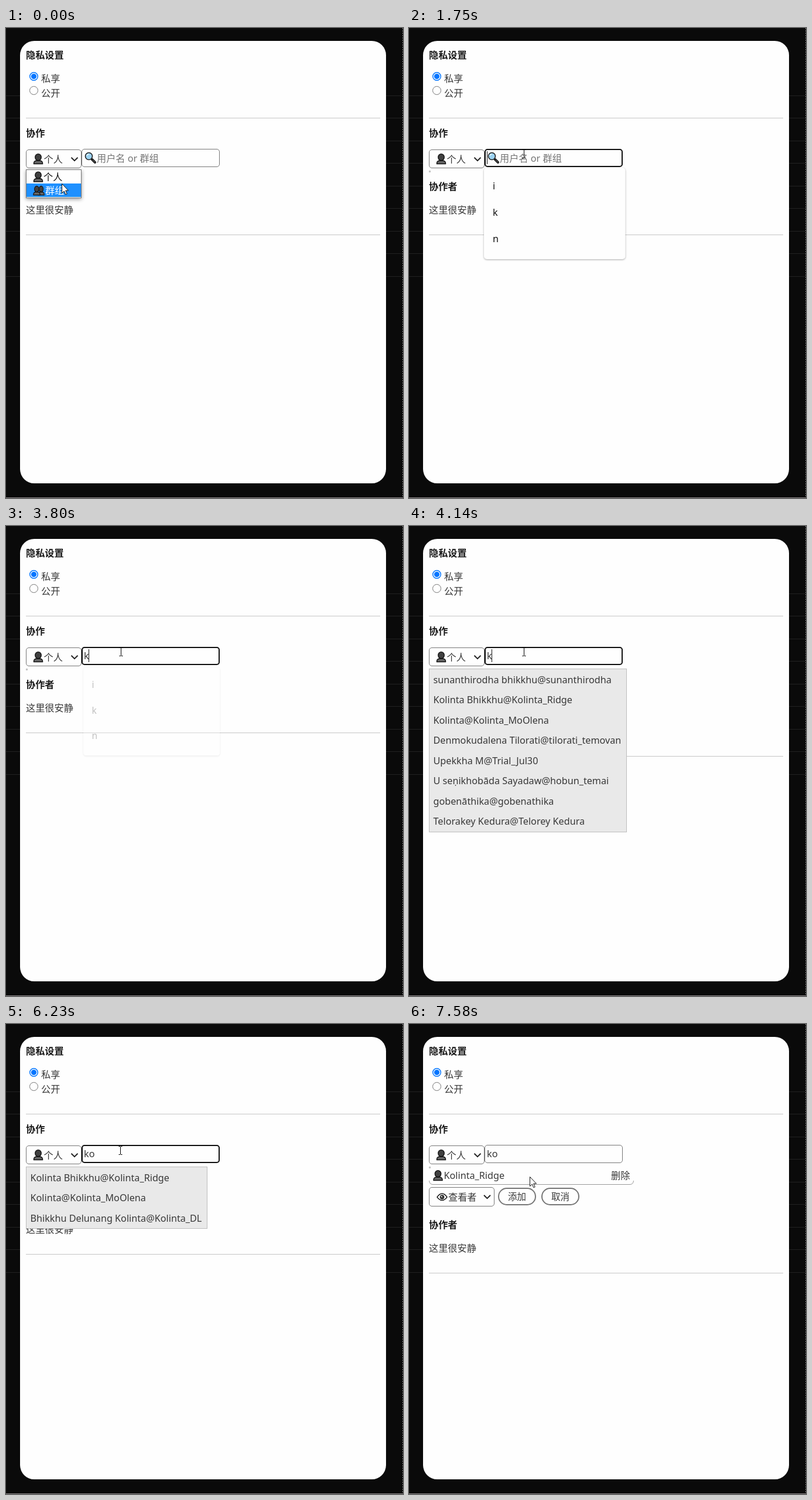
Write an HTML page that moves like this. It is 678x801 px and loops after 8000 ms.

```html
<!DOCTYPE html>
<html lang="zh-CN">
<head>
<meta charset="utf-8">
<title>隐私设置</title>
<style>
  html, body { margin: 0; width: 100%; height: 100%; overflow: hidden; background: #0a0a0a; }
  svg { display: block; font: 16.2px 'Noto Sans', 'Noto Sans CJK SC', sans-serif; fill: #383838; }
  text { white-space: pre; }
  .title { font-weight: 700; fill: #1a1a1a; }
  .hint { fill: #757575; }
  .black { fill: #111; }
  .white { fill: #fff; }
  .box { fill: #fefefe; stroke: #767676; }
  .focus { fill: #fefefe; stroke: #101010; stroke-width: 2; }
  .rule { stroke: #c6c6c6; }
  .list { fill: #e9e9e9; stroke: #bdbdbd; }
  .pick { fill: #1e90ff; }
  .row { fill: #6ba6ff; }
  .pill { fill: #fefefe; stroke: #767676; stroke-width: 2; }
  .small { font-size: 15.5px; }
  .shade { filter: drop-shadow(0 2px 3px #0006); }
  .soft { filter: drop-shadow(0 1px 1.5px #0005); }
</style>
</head>
<body>
<svg width="678" height="801" viewBox="0 0 678 801">
  <defs>
    <g id="person" stroke="#111" stroke-width="1.4">
      <path d="M-7.5 8.5V7Q-7 3.500-3 3H3Q7 3.500 7.500 7V8.500Z" fill="#666"/>
      <ellipse cy="-2.8" rx="5.2" ry="5.6" fill="#404040"/>
    </g>
    <g id="people">
      <use href="#person" transform="translate(4 0) scale(.7 .9)"/>
      <use href="#person" transform="translate(-3.5 0) scale(.75 .9)"/>
    </g>
    <g id="lens">
      <path d="M3 3L8 8" stroke="#111" stroke-width="4" stroke-linecap="round"/>
      <path d="M4 4L8 8" stroke="#555" stroke-width="1.6" stroke-linecap="round"/>
      <circle cx="-2.5" cy="-2.5" r="6" fill="#9cd3f3" stroke="#222" stroke-width="1.6"/>
      <path d="M-6-3Q-5.5-6-2.5-6" fill="none" stroke="#e8f6ff" stroke-width="1.3"/>
    </g>
    <g id="eye" stroke="#111">
      <path d="M-8.5 0Q0-12 8.5 0Q0 11-8.5 0Z" fill="#fff" stroke-width="1.3"/>
      <circle r="3.4" fill="#444"/>
      <circle cx="-1" cy="-1" r="1" fill="#fff" stroke="none"/>
    </g>
    <path id="chevron" d="M-5.5-2.7L0 2.7L5.5-2.7" fill="none" stroke="#222" stroke-width="1.9"/>
    <path id="arrow" d="M.5.5V16.5L4.3 13L6.8 18.7L9.2 17.7L6.7 12H11.5Z" fill="#fff" stroke="#111"/>
    <path id="beam" d="M-3-7H-.5M.5-7H3M0-6.5V6.5M-3 7H-.5M.5 7H3" fill="none" stroke="#000"/>
    <g id="busy" fill="none">
      <circle r="8.7" stroke="#fff" stroke-width="2"/>
      <circle r="9.8" stroke="#111"/>
      <circle r="7.6" stroke="#333" stroke-width=".7"/>
      <path d="M0-7V7" stroke="#fff" stroke-width="3"/>
      <use href="#beam"/>
    </g>
    <rect id="caret" class="black" y="210" width="1" height="22"/>
    <g id="collab">
      <text class="title" x="34" y="276">协作者</text>
      <text x="34" y="315.5">这里很安静</text>
      <path class="rule" d="M34 352.5H639"/>
    </g>
    <g id="popup">
      <rect class="soft" x="128" y="238" width="241.5" height="156" rx="5" fill="#fefefe"/>
      <g class="black">
        <text x="143" y="275">i</text>
        <text x="143" y="320">k</text>
        <text x="143" y="365">n</text>
      </g>
    </g>
  </defs>

  <rect width="678" height="801" fill="#0a0a0a"/>
  <g id="grid" stroke="#222"></g>
  <path d="M677.5 0V801" stroke="#777" stroke-dasharray="2 2"/>
  <path d="M0 800.5H678" stroke="#8c8688"/>
  <rect x="24" y="22" width="625" height="754" rx="24.3" fill="#fefefe"/>

  <text class="title" x="34" y="52">隐私设置</text>
  <circle cx="47.5" cy="82.5" r="6.8" fill="#fff" stroke="#0075ff" stroke-width="1.5"/>
  <circle cx="47.5" cy="82.5" r="4.6" fill="#0075ff"/>
  <circle cx="47.5" cy="106.5" r="7" class="box"/>
  <text x="60" y="91.5">私享</text>
  <text x="60" y="116.5">公开</text>
  <path class="rule" d="M34 153.5H639"/>
  <text class="title" x="34" y="185">协作</text>

  <use href="#collab" data-on="0-4140"/>
  <use href="#collab" y="40" data-on="4140-7580"/>
  <use href="#collab" y="72" data-on="7580-8000"/>

  <rect class="box" x="34.5" y="207.5" width="94" height="31" rx="4.5"/>
  <use href="#person" x="55" y="223"/>
  <text x="64.5" y="229.5">个人</text>
  <use href="#chevron" x="117" y="223.5"/>

  <rect class="box" x="129.5" y="206.5" width="235" height="30" rx="4.5" data-on="0-1750 7240-8000"/>
  <rect class="focus" x="130" y="207" width="234" height="29" rx="4" data-on="1750-7240"/>
  <g data-on="0-3800">
    <use href="#lens" x="144" y="221"/>
    <text class="hint" x="155" y="227.5">用户名 or 群组</text>
  </g>
  <text x="133" y="227" data-on="3800-4840">k</text>
  <text x="133" y="227" data-on="4840-8000">ko</text>
  <use href="#caret" x="133" data-on="1750-2440 2780-3120"/>
  <use href="#caret" x="141" data-on="3800-4500"/>
  <use href="#caret" x="151" data-on="4840-5180 5890-6230 6900-7240"/>
  <rect x="34.5" y="243.5" width="2" height="2" class="list" data-on="1750-4140 7580-8000"/>

  <g data-on="0-1070">
    <rect class="box shade" x="34.5" y="241.5" width="94" height="48"/>
    <rect class="pick" x="35" y="265" width="93" height="23" data-on="0-360"/>
    <rect class="pick" x="35" y="242" width="93" height="23" data-on="360-1070"/>
    <use href="#person" x="55" y="253.5"/>
    <use href="#people" x="56" y="277"/>
    <g data-on="0-360">
      <text class="black" x="64" y="259.5">个人</text>
      <text class="white" x="67" y="282.5">群组</text>
    </g>
    <g data-on="360-1070">
      <text class="white" x="64" y="259.5">个人</text>
      <text class="black" x="67" y="282.5">群组</text>
    </g>
  </g>

  <use href="#popup" data-on="1750-3800"/>
  <use href="#popup" opacity=".25" transform="translate(248.7 316) scale(.966) translate(-248.7 -316)" data-on="3800-4140"/>

  <g id="wide" data-on="4140-4840">
    <rect class="list" x="34.5" y="243.5" width="337" height="278"/>
  </g>
  <g id="narrow" data-on="4840-7580">
    <rect class="list" x="34.5" y="243.5" width="309" height="105"/>
    <rect class="row" x="35" y="244" width="308" height="35" data-on="6570-7580"/>
  </g>

  <g data-on="7580-8000">
    <path d="M34.5 267Q35 273.5 41 273.5H377Q383 273.5 383.5 267" fill="none" stroke="#999"/>
    <use href="#person" x="49.5" y="258"/>
    <text x="59.5" y="264">Kolinta_Ridge</text>
    <text x="345" y="264">删除</text>
    <rect class="box" x="34.5" y="278.5" width="111" height="32" rx="4.5"/>
    <use href="#eye" x="56.5" y="295"/>
    <text x="67" y="300.5">查看者</text>
    <use href="#chevron" x="133.5" y="294.5"/>
    <rect class="pill" x="153" y="280" width="63" height="28" rx="14"/>
    <text class="small" x="169" y="300">添加</text>
    <rect class="pill" x="227" y="280" width="63" height="28" rx="14"/>
    <text class="small" x="243" y="300">取消</text>
  </g>

  <use href="#arrow" x="95" y="265" data-on="0-360"/>
  <use href="#arrow" x="100" y="253" data-on="360-1070"/>
  <use href="#arrow" x="109" y="250" data-on="1070-1410"/>
  <use href="#beam" x="196.5" y="214.5" data-on="1410-6230"/>
  <use href="#beam" x="195.5" y="215.5" data-on="6230-6570"/>
  <use href="#beam" x="202.5" y="260.5" data-on="6570-6900"/>
  <use href="#beam" x="208.5" y="261.5" data-on="6900-7240"/>
  <use href="#busy" x="207.5" y="261.5" data-on="7240-7580"/>
  <use href="#arrow" x="206" y="260" data-on="7580-8000"/>
</svg>
<script>
const LOOP = 8000;
const ROW_HEIGHT = 34.45;
const byId = id => document.getElementById(id);

function add(parent, tag, attrs, content = '') {
  const node = document.createElementNS(parent.namespaceURI, tag);
  for (const key in attrs) node.setAttribute(key, attrs[key]);
  node.textContent = content;
  parent.append(node);
  return node;
}

for (let i = 0; i < 9; i++) {
  const y = Math.floor(115 + i * 38.5) + 0.5;
  add(byId('grid'), 'path', { d: `M0 ${y}H24M649 ${y}H678` });
}

function addRows(parent, names) {
  return names.map((name, i) =>
    add(parent, 'text', { x: 41.5, y: 268 + i * ROW_HEIGHT }, name));
}

addRows(byId('wide'), [
  'sunanthirodha bhikkhu@sunanthirodha',
  'Kolinta Bhikkhu@Kolinta_Ridge',
  'Kolinta@Kolinta_MoOlena',
  'Denmokudalena Tilorati@tilorati_temovan',
  'Upekkha M@Trial_Jul30',
  'U seṇikhobāda Sayadaw@hobun_temai',
  'gobenāthika@gobenathika',
  'Telorakey Kedura@Telorey Kedura'
]);
const [firstRow] = addRows(byId('narrow'), [
  'Kolinta Bhikkhu@Kolinta_Ridge',
  'Kolinta@Kolinta_MoOlena',
  'Bhikkhu Delunang Kolinta@Kolinta_DL'
]);

const timed = [...document.querySelectorAll('[data-on]')].map(node => ({
  node,
  spans: node.dataset.on.split(' ').map(span => span.split('-').map(Number))
}));

function render(time) {
  const t = time % LOOP;
  for (const { node, spans } of timed) {
    const shown = spans.some(([from, to]) => t >= from && t < to);
    node.style.display = shown ? '' : 'none';
  }
  firstRow.classList.toggle('white', t >= 6570);
}

const start = performance.now();
function tick() {
  render(performance.now() - start);
  requestAnimationFrame(tick);
}
tick();
</script>
</body>
</html>
```
